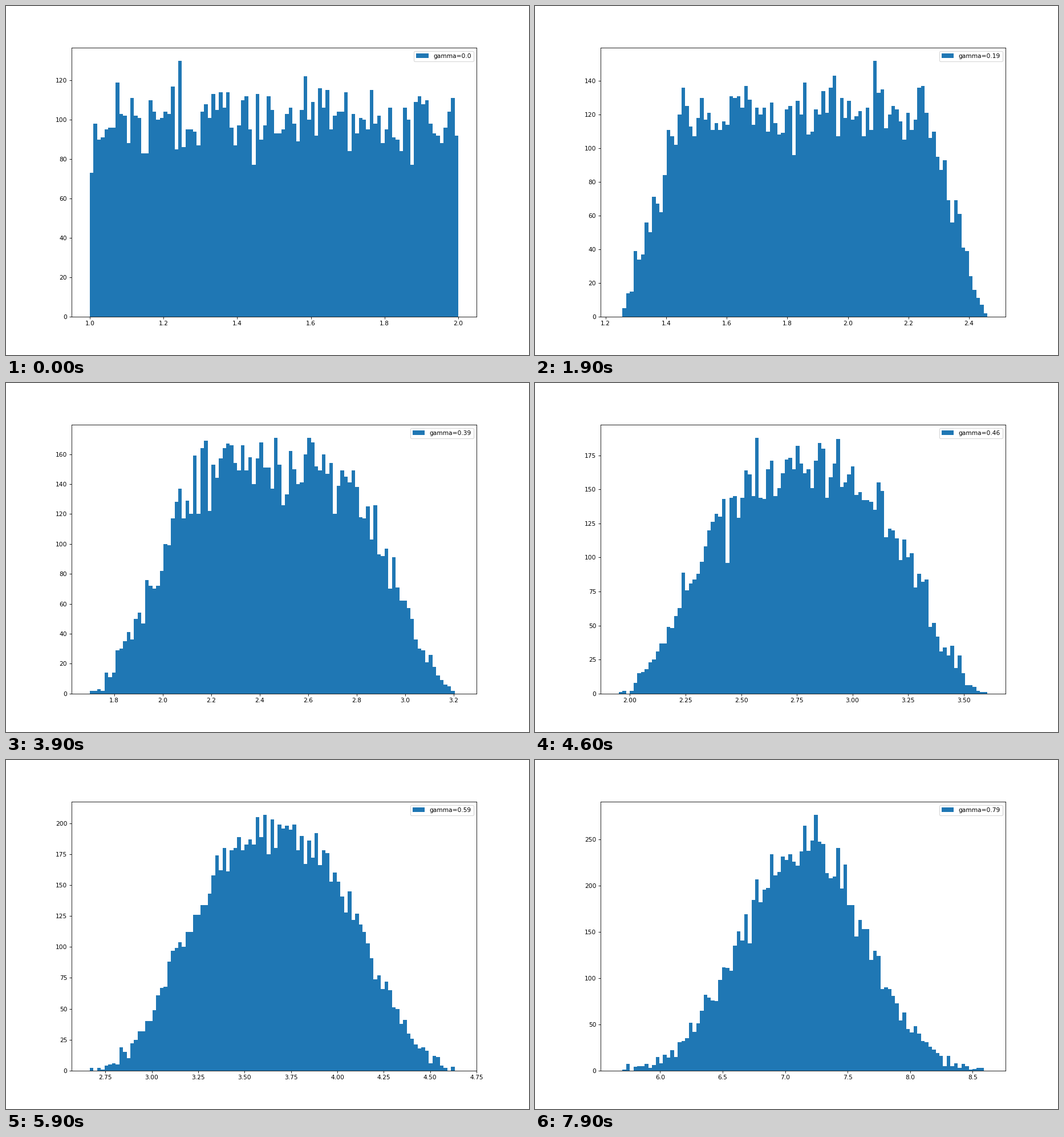
Write a matplotlib script that moves like this. It is 917 px wide and 611 px high and loops after 8000 ms.

```python
import matplotlib.pyplot as plt
import numpy as np
from matplotlib.animation import FuncAnimation

FRAMES, INTERVAL = 80, 100
SAMPLES, BINS, TERMS = 10000, 100, 40


def discounted_sums(gamma, rng):
    """Sum of gamma**k * U(1, 2) over k, for many independent samples."""
    total = np.zeros(SAMPLES)
    for _ in range(TERMS):
        total = gamma * total + rng.uniform(1, 2, SAMPLES)
    return total


def value_range(gamma):
    """Typical extent of the samples: the tails grow longer with gamma."""
    mean = 1.5 / (1 - gamma)
    sd = 1 / np.sqrt(12 * (1 - gamma**2))
    half = (np.sqrt(3) + 1.77 * gamma) * sd
    return mean - half, mean + half


# A 12 x 8 inch layout on a 917 x 611 pixel stage
fig, ax = plt.subplots(figsize=(12.00655, 8), dpi=76.375)
bars = ax.bar(np.arange(BINS), np.ones(BINS), 1, align="edge",
              color="C0", label="gamma=0.0")
legend = ax.legend(loc="upper right")


def draw(step):
    gamma = step / 100
    values = discounted_sums(gamma, np.random.default_rng(step))
    lo, hi = value_range(gamma)
    counts, edges = np.histogram(values, BINS, (lo, hi))
    for bar, x, count in zip(bars, edges, counts):
        bar.set_bounds(x, 0, edges[1] - edges[0], count)
    pad = 0.05 * (hi - lo)
    ax.set_xlim(lo - pad, hi + pad)
    ax.set_ylim(0, 1.05 * counts.max())
    legend.get_texts()[0].set_text(f"gamma={gamma}")


anim = FuncAnimation(fig, draw, frames=FRAMES, interval=INTERVAL,
                     init_func=lambda: draw(0), repeat=True, repeat_delay=0)
plt.show()
```
